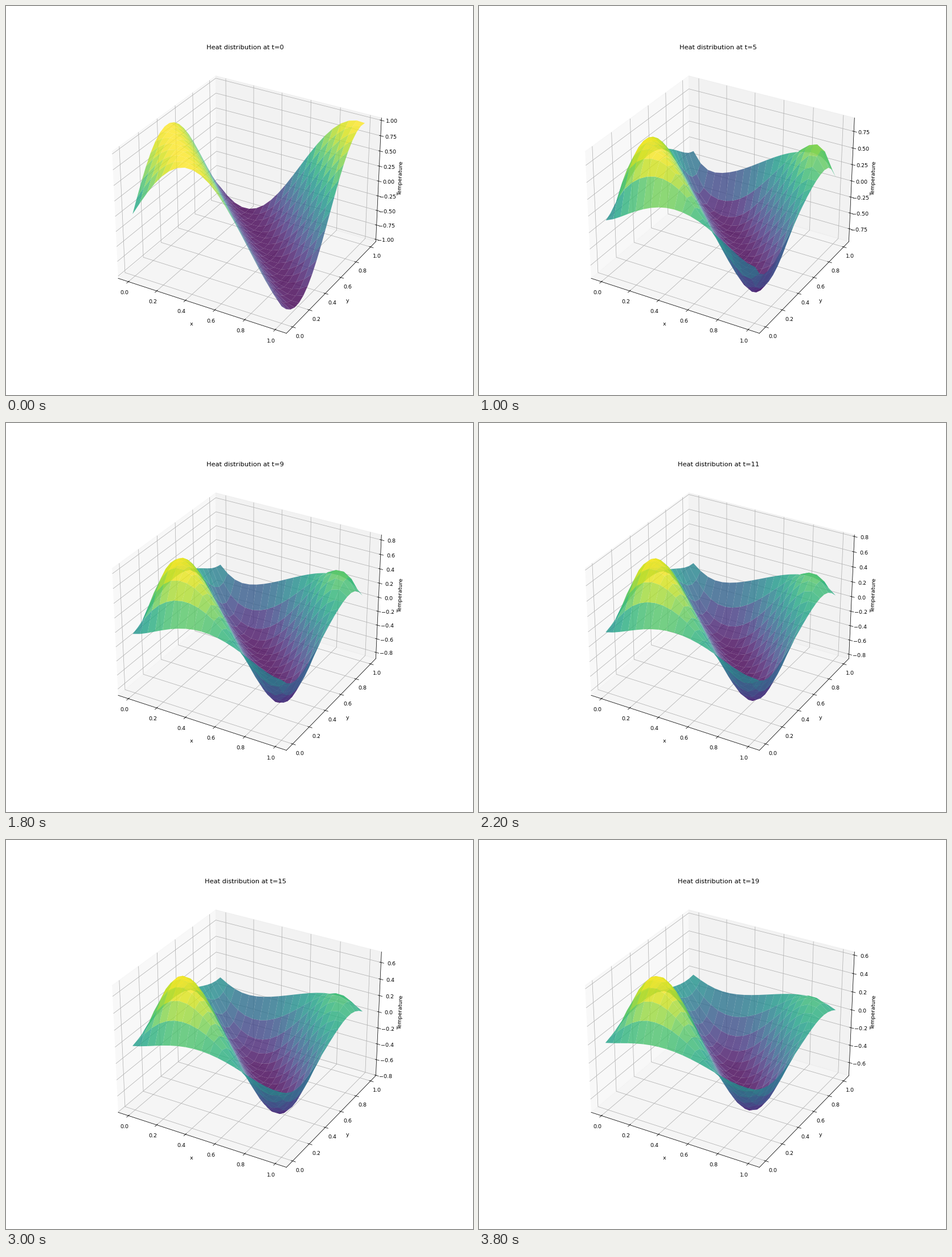
A matplotlib script that plays this animation: 820 px wide and 683 px high, repeating every 4 s.

```python
import numpy as np
import matplotlib.pyplot as plt
from matplotlib.animation import FuncAnimation

N = 20            # grid points per side
STEPS = 20        # time steps in one loop
ALPHA = 0.01      # thermal diffusivity
DPI = 205 / 3
WIDTH, HEIGHT = 820, 683

axis = np.linspace(0, 1, N)
dx = axis[1] - axis[0]
dt = 1 / (STEPS - 1)
X, Y = np.meshgrid(axis, axis)


def laplacian(u):
    """Five-point Laplacian with periodic edges."""
    return sum(np.roll(u, s, a) for s in (-1, 1) for a in (0, 1)) - 4 * u


def solve():
    states = [np.sin(4 * (X + Y))]
    for _ in range(STEPS - 1):
        u = states[-1]
        states.append(u + ALPHA * dt / dx**2 * laplacian(u))
    return states


states = solve()

# The tiny surplus keeps the pixel size from rounding down
fig = plt.figure(figsize=((WIDTH + 1e-4) / DPI, (HEIGHT + 1e-4) / DPI), dpi=DPI)
ax = fig.add_subplot(111, projection="3d")


def update(step):
    ax.clear()
    ax.plot_surface(X, Y, states[step], cmap="viridis", alpha=0.8)
    ax.set_title(f"Heat distribution at t={step}")
    ax.set_xlabel("x")
    ax.set_ylabel("y")
    ax.set_zlabel("Temperature")


anim = FuncAnimation(fig, update, frames=STEPS, interval=200, repeat=True)
plt.show()
```
